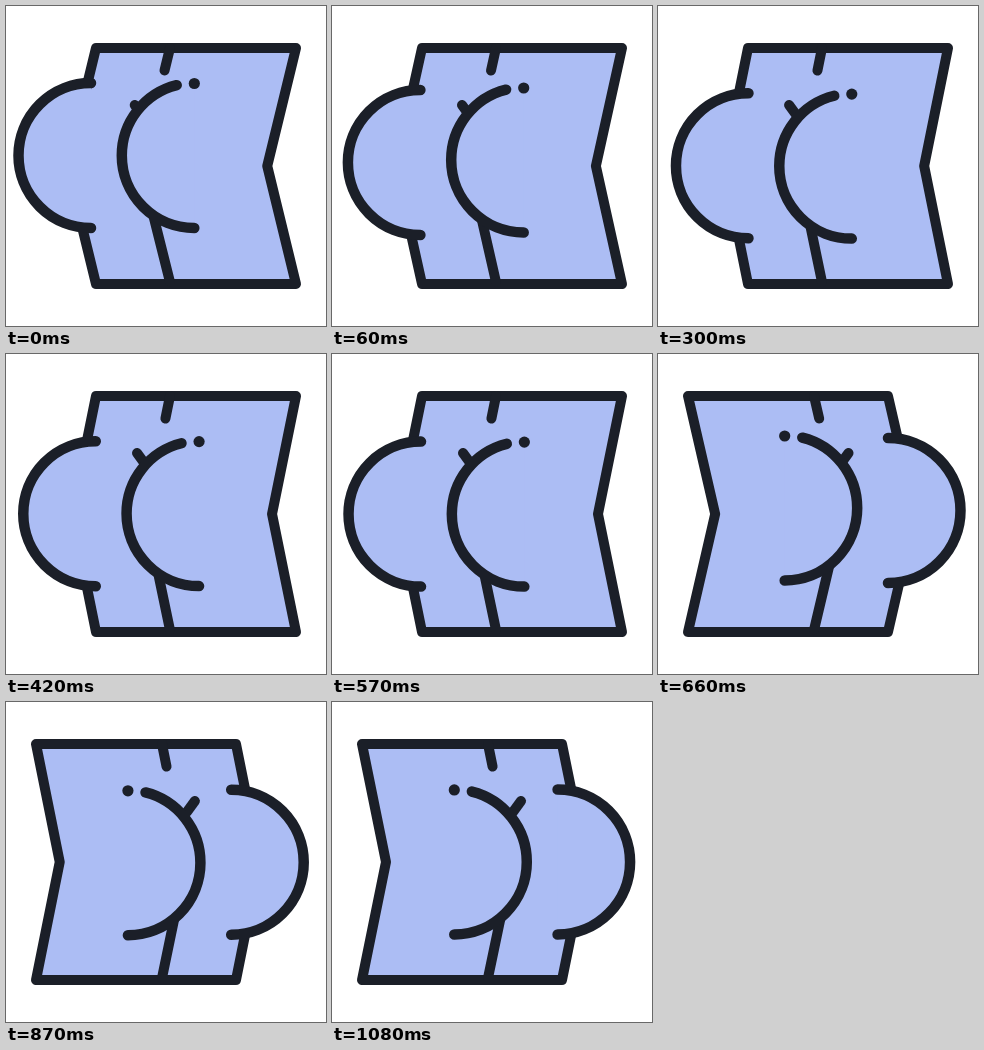
Recreate the animation shown at these times as an HTML page with a canvas. Size 320 by 320 pixels, loop 1.14 s.

```html
<!DOCTYPE html>
<html lang="en">
<head>
<meta charset="utf-8">
<title>Bouncing hips</title>
<style>
html, body { margin: 0; width: 100%; height: 100%; overflow: hidden; background: #fff; }
canvas { display: block; width: 320px; height: 320px; }
</style>
</head>
<body>
<canvas id="stage" width="320" height="320"></canvas>
<script>
const ctx = document.getElementById('stage').getContext('2d');
const INK = '#1b1f28', BLUE = '#acbdf4';
const LOOP = 1140, FLIP = 600, STEP = 30, LAST = 1080;
const TOP = 42, MID = 160, BOTTOM = 278, RADIUS = 72.5;
const LAG = 20; // the near cheek follows the far one

// Damped swing: 1 at the start, settling to 0
const swing = (t, decay, period) => Math.exp(-decay * t) * Math.cos(2 * Math.PI * t / period);
const bounce = t => -10.5 * swing(Math.max(t, 0), 0.008, 380);

function line(points) {
  ctx.beginPath();
  points.forEach(([x, y]) => ctx.lineTo(x, y));
  ctx.stroke();
}

function cheek(x, y, gap) {
  const bottom = Math.PI / 2, top = bottom * 3;
  ctx.beginPath();
  ctx.arc(x, y, RADIUS, bottom, top);
  ctx.fillStyle = BLUE;
  ctx.fill();
  ctx.beginPath();
  ctx.arc(x, y, RADIUS, bottom, top - gap);
  ctx.stroke();
}

function drawBody(lean) {
  // Point on a side line that bends at the waist
  const side = (x, y) => [x - (24 + lean) * (1 - Math.abs(y - MID) / (MID - TOP)), y];

  ctx.lineWidth = 10;
  ctx.beginPath();
  for (const [x, y] of [[90, TOP], [290, TOP], side(290, MID), [290, BOTTOM], [90, BOTTOM], side(90, MID)]) {
    ctx.lineTo(x, y);
  }
  ctx.closePath();
  ctx.fillStyle = BLUE;
  ctx.fill();
  ctx.stroke();

  line([[164, TOP], side(164, 64.5)]);
  line([side(164, 207), [164, BOTTOM - 2]]);
  const tick = 131 - 0.48 * lean;
  line([[tick, 99], [tick + 8, 110]]);
}

function drawCheeks(dx, t) {
  const nearX = 193.3 + dx, nearY = MID + bounce(t - LAG);
  ctx.lineWidth = 10.5;
  cheek(90 + dx, MID + bounce(t), 0);
  cheek(nearX, nearY, 0.245);
  ctx.beginPath();
  ctx.arc(nearX, nearY - RADIUS + 0.5, 5.6, 0, 2 * Math.PI);
  ctx.fillStyle = INK;
  ctx.fill();
}

function render(now) {
  const time = Math.min(Math.floor(now % LOOP / STEP) * STEP, LAST);
  const flipped = time >= FLIP;
  const t = flipped ? time - FLIP : time;
  const sway = (flipped ? 9.9 : 6.6) * swing(t, 0.011, 700);
  const rest = flipped ? 4.4 : 1.6 - 0.0045 * t;

  ctx.setTransform(1, 0, 0, 1, 0, 0);
  ctx.fillStyle = '#fff';
  ctx.fillRect(0, 0, 320, 320);
  if (flipped) ctx.setTransform(-1, 0, 0, 1, 320, 0);
  ctx.strokeStyle = INK;
  ctx.lineCap = ctx.lineJoin = 'round';
  drawBody(0.72 * sway);
  drawCheeks(rest - sway, t);
}

const start = performance.now();
function animate() {
  render(performance.now() - start);
  requestAnimationFrame(animate);
}
animate();
</script>
</body>
</html>
```
